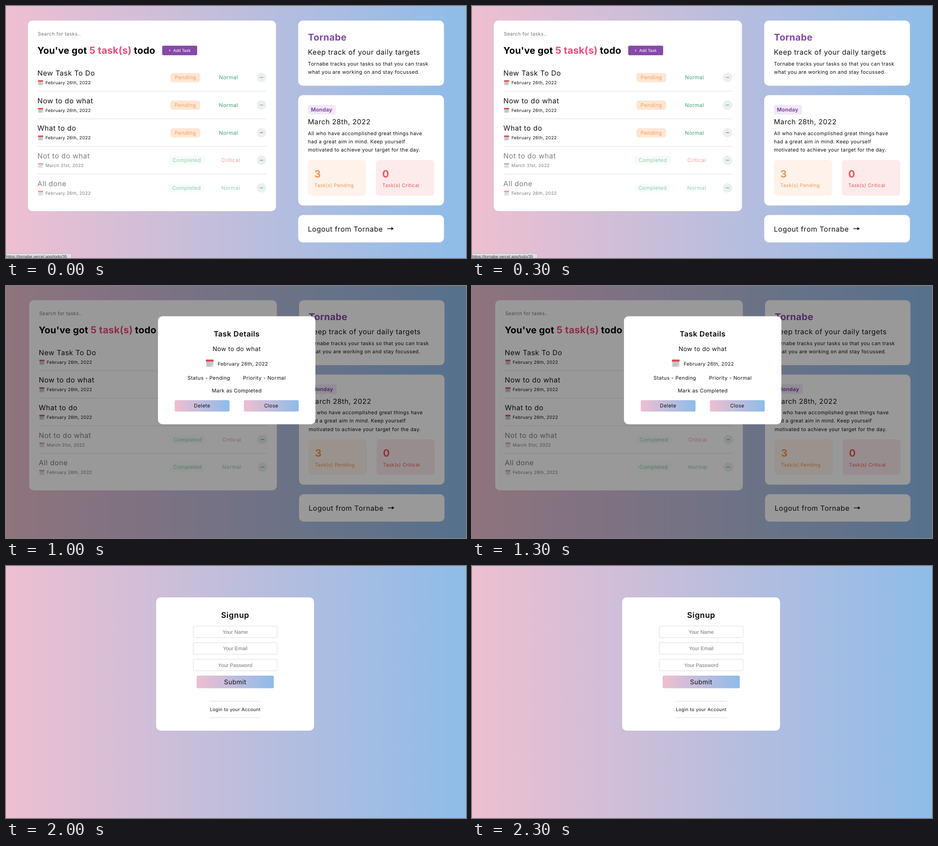
Animation of 1011 by 554 pixels, one loop 2500 ms. Source, as an HTML page:

```html
<!DOCTYPE html>
<html lang="en">
<head>
<meta charset="utf-8">
<title>Task list</title>
<style>
html, body { margin: 0; width: 100%; height: 100%; overflow: hidden; }
svg { display: block; width: 100%; height: 100%; }
text { font-family: Inter, sans-serif; letter-spacing: .035em; text-rendering: geometricPrecision; white-space: pre; }
.ui { font-family: "Liberation Sans", Arial, sans-serif; letter-spacing: 0; }
.mono { font-family: "DejaVu Sans Mono", monospace; letter-spacing: .07em; }
.bold { font-weight: 700; letter-spacing: .012em; }
.semi { font-weight: 600; }
.mid { text-anchor: middle; }
.link { text-decoration: underline; }
</style>
</head>
<body>
<svg id="stage" viewBox="0 0 1011 554" preserveAspectRatio="none"></svg>
<script>
const PURPLE = '#8549a8', ORANGE = '#f0954f', RED = '#e8575b', GREEN = '#36a469', INK = '#111';

const rect = (x, y, w, h, r, fill, more = '') =>
  `<rect x="${x}" y="${y}" width="${w}" height="${h}" rx="${r}" fill="${fill}" ${more}/>`;
const text = (x, y, size, str, fill = INK, cls = '') =>
  `<text x="${x}" y="${y}" font-size="${size}" fill="${fill}" class="${cls}">${str}</text>`;
const mid = (x, y, size, str, fill, cls = '') => text(x, y, size, str, fill, 'mid ' + cls);
const path = (d, color, width = 1, more = '') =>
  `<path d="${d}" fill="none" stroke="${color}" stroke-width="${width}" ${more}/>`;
const rule = (x1, x2, y) => path(`M${x1} ${y}H${x2}`, '#ddd');
const card = (x, y, w, h) => rect(x, y, w, h, 10, '#fff');
const icon = (x, y, size) =>
  `<use href="#calendar" transform="translate(${x} ${y}) scale(${size / 12})"/>`;
const box = (x, y, w, h) => rect(x, y, w, h, 3, '#fff', 'stroke="#dcdcdc"');

const input = (x, y, w, label) => box(x, y, w, 25.5) + mid(x + w / 2, y + 16.6, 11.2, label, '#757575', 'ui');
const button = (x, y, w, h, size, label) =>
  rect(x, y, w, h, 3, 'url(#fade)') + mid(x + w / 2, y + h / 2 + size * .36, size, label);

const defs = `<defs>
  <linearGradient id="fade"><stop stop-color="#eebfd0"/><stop offset="1" stop-color="#8ebce9"/></linearGradient>
  <g id="calendar">
    ${rect(.4, .5, 11.2, 11, 1, '#d9dcde')}
    ${rect(.4, .5, 11.2, 3.2, .8, '#dd4b4b')}
    ${path('M2 5.5H10M2 7.5H10M2 9.5H8', '#8d9499', 1, 'stroke-dasharray="1.1 .6"')}
  </g>
</defs>`;
const backdrop = rect(0, 0, 1011, 554, 0, 'url(#fade)');

function task(i, title, date, done, priority) {
  const critical = priority === 'Critical';
  const px = done ? (critical ? 397.2 : 396.7) : 394.2, w = done ? 79 : 65.5;
  const dots = [-2.4, 0, 2.4].map(d => `<circle cx="${561.5 + d}" cy="157" r=".8" fill="#444"/>`).join('');
  return `<g transform="translate(0 ${i * 60.7})">
    <g opacity="${done ? .55 : 1}">
      ${text(69, 153, 15.5, title)}${icon(70, 162.8, 12)}${text(86.7, 172, 9.65, date)}
      ${rect(px - w / 2, 147, w, 20.5, 6, done ? '#f2faf6' : '#fde6d5')}
      ${mid(px, 161.2, 11.5, done ? 'Completed' : 'Pending', done ? GREEN : '#f3a05c')}
      ${mid(done ? 494 : 489, 161.2, 11.5, priority, critical ? '#ee4a58' : GREEN)}
    </g>
    <circle cx="561.5" cy="157" r="10.5" fill="#eaf0f0"/>${dots}
    ${i < 4 ? rule(69, 572, 187.3) : ''}
  </g>`;
}

const stat = (x, count, label, color, fill) =>
  rect(x, 338.5, 128, 78.5, 7, fill) + text(x + 14, 377, 22, count, color, 'bold') +
  text(x + 14, 398.3, 10.7, label, color);

const feb = 'February 26th, 2022';
const board = [
  card(48, 32, 545.3, 419),
  text(70, 65, 10.6, 'Search for tasks..', '#757575'),
  text(69, 105, 20.4, "You've got", '#000', 'bold'),
  text(183, 105, 21.3, '5 task(s)', '#f0487a', 'bold'),
  text(281, 105, 20.8, 'todo', '#000', 'bold'),
  rect(343.3, 87.2, 76.8, 21.1, 3, PURPLE),
  text(357, 101, 9.3, '+', '#fff', 'ui'), text(367.5, 101, 9.3, 'Add Task', '#fff', 'ui'),
  task(0, 'New Task To Do', feb, false, 'Normal'),
  task(1, 'Now to do what', feb, false, 'Normal'),
  task(2, 'What to do', feb, false, 'Normal'),
  task(3, 'Not to do what', 'March 31st, 2022', true, 'Critical'),
  task(4, 'All done', feb, true, 'Normal'),

  card(642.2, 32, 320.3, 143.2),
  text(663.5, 76, 20.6, 'Tornabe', PURPLE, 'bold'),
  text(663.5, 107, 15.5, 'Keep track of your daily targets'),
  text(663.5, 130.6, 11, 'Tornabe tracks your tasks so that you can trask'),
  text(663.5, 149, 11, 'what you are working on and stay focussed.'),

  card(642.2, 196, 320.3, 242.4),
  rect(663.5, 217.5, 61.5, 21, 4, '#f1e8f7'),
  text(670, 232, 11.7, 'Monday', PURPLE, 'bold'),
  text(663.5, 260, 15.3, 'March 28th, 2022'),
  text(663.5, 283.5, 11, 'All who have accomplished great things have'),
  text(663.5, 301.7, 11, 'had a great aim in mind. Keep yourself'),
  text(663.5, 320, 11, 'motivated to achieve your target for the day.'),
  stat(663.5, 3, 'Task(s) Pending', ORANGE, '#fef2ea'),
  stat(813, 0, 'Task(s) Critical', RED, '#fdebec'),

  card(642.2, 459.5, 320.3, 60.3),
  text(663.5, 495.5, 15.5, 'Logout from Tornabe'),
  path('M838 489.5H850', INK, 1.5),
  `<path d="M847 486L852 489.5L847 493Z" fill="${INK}"/>`
].join('');

const dimmed = (scale, x, y) =>
  `${backdrop}<g transform="translate(${x} ${y}) scale(${scale})">${board}</g>` +
  rect(0, 0, 1011, 554, 0, '#000', 'opacity=".4"');

const scenes = [
  [backdrop, board,
    rect(-4, 544, 148, 14, 3, '#dfdfe3', 'stroke="#aaa" stroke-width=".7"'),
    text(0, 554, 9, 'https://tornabe.vercel.app/todo/35', '#333', 'ui')],

  [dimmed(.9945, 3.27, 1.2), card(333, 68, 345, 235.5),
    input(413.8, 89.5, 183.5, 'Enter Your Task Todo'),
    box(421.3, 126, 168.5, 26), mid(501.3, 143, 11.3, 'Normal', '#000', 'ui'),
    path('M581 137.6L583.6 140.2L586.2 137.6', '#222', 1.2),
    box(413.8, 163.2, 183.5, 28), text(453, 181.5, 10.5, '28/02/2022', '#000', 'mono'),
    path('M576 173H586V182H576Z', '#000', 1.4), rect(575.5, 172, 11, 3, 0, '#000'),
    path('M578 170.5V173M584 170.5V173', '#000', 1.3), rect(581.5, 177.5, 3, 3, 0, '#000'),
    rect(407.3, 208, 8.5, 8.5, 1.5, '#fff', 'stroke="#767676"'),
    text(421, 217, 11.1, 'Add an Event in Quelbo Calendar'),
    button(421, 234, 169, 27.5, 13.1, 'Add Task'),
    mid(505.3, 286.5, 10.8, 'Close')],

  [dimmed(.998, 3.1, -.8), card(334, 66.6, 346, 237.4),
    mid(507, 111, 16.1, 'Task Details', '#000', 'semi'),
    mid(507, 142.5, 13.4, 'Now to do what'),
    icon(438.8, 161, 18), text(465.2, 174.5, 10.7, feb),
    text(399, 206, 11.1, 'Status - Pending'), text(521, 206, 11.1, 'Priority - Normal'),
    mid(507, 234, 11.2, 'Mark as Completed'),
    button(370.8, 251, 120.5, 25, 11.1, 'Delete'),
    button(522.8, 251, 120.5, 25, 10.9, 'Close')],

  [backdrop, card(333, 67.3, 345, 274.5),
    mid(505, 112, 17, 'Signin', '#000', 'semi'),
    input(414, 130, 183.3, 'Your Email'), input(414, 166.2, 183.3, 'Your Password'),
    button(421, 202.5, 169, 27.5, 14, 'Submit'),
    mid(505.5, 254.3, 9.75, 'Click here for 1-click Guest Login', INK, 'link'),
    rule(453.5, 557.5, 277.7), mid(505.5, 298.5, 9.85, 'Create New Account'), rule(453.5, 557.5, 313.5),
    '<path d="M0 549Q0 554 5 554H0ZM1011 549Q1011 554 1006 554H1011Z" fill="#2a1240"/>'],

  [backdrop, card(330, 69, 347, 293),
    mid(503.7, 113.7, 17.2, 'Signup', '#000', 'semi'),
    input(411.5, 132, 184.5, 'Your Name'), input(411.5, 168.5, 184.5, 'Your Email'),
    input(411.5, 205, 184.5, 'Your Password'),
    button(419, 241, 169.5, 27.7, 14, 'Submit'),
    rule(447.5, 560, 297.3), mid(503.7, 318.5, 10, 'Login to your Account'), rule(447.5, 560, 333.4)]
];

const stage = document.getElementById('stage');
stage.innerHTML = defs + scenes.map(s => `<g class="scene">${s.join('')}</g>`).join('');
const groups = stage.querySelectorAll('.scene');

function draw() {
  const now = Math.floor(performance.now() % 2500 / 500);
  groups.forEach((g, i) => g.style.display = i === now ? '' : 'none');
  requestAnimationFrame(draw);
}
draw();
</script>
</body>
</html>
```
